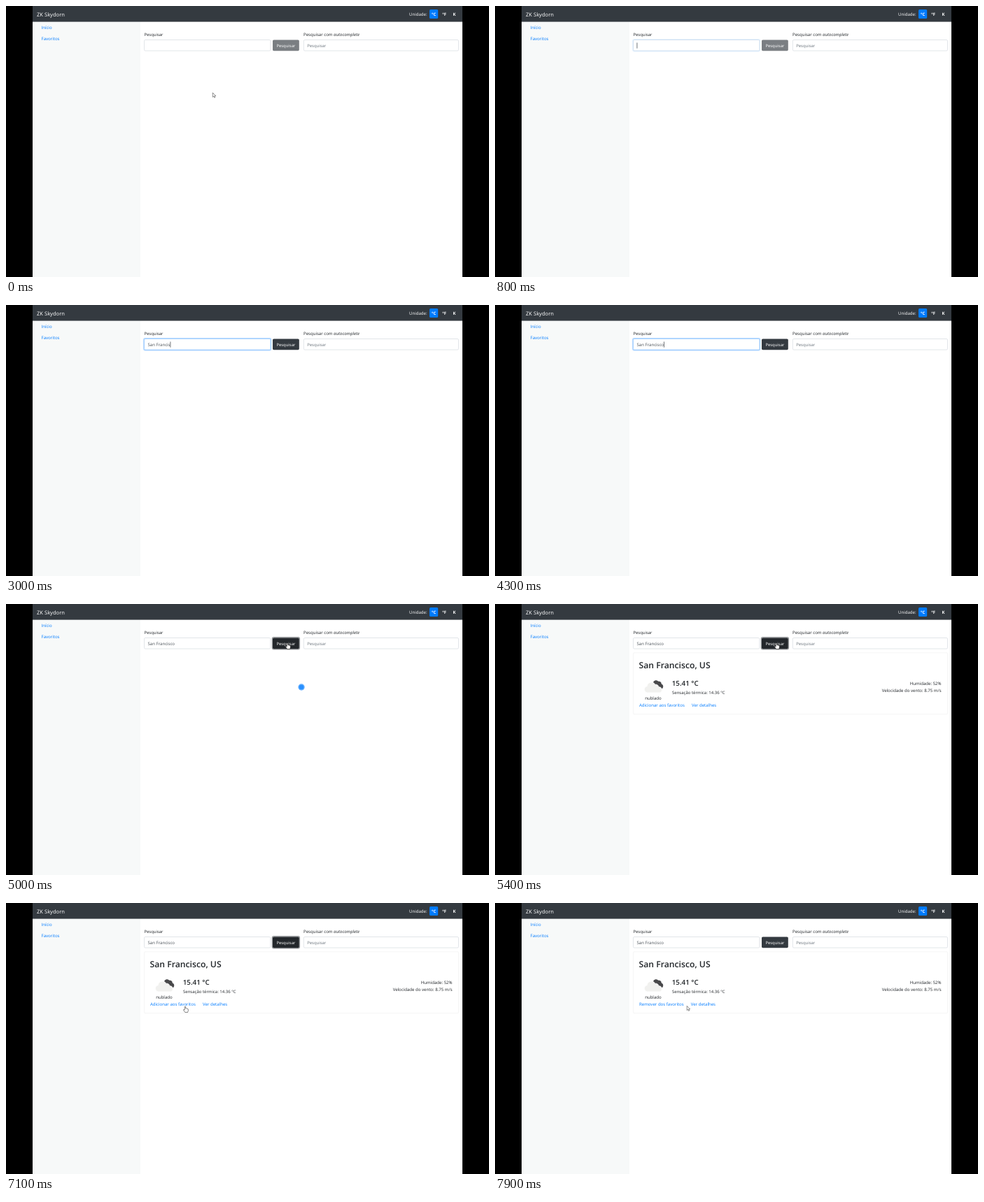
An HTML page for the animation above (8 s loop, 690x388 px).

```html
<!DOCTYPE html>
<html lang="pt">
<head>
<meta charset="utf-8">
<title>Clima</title>
<style>
html, body { margin: 0; width: 100%; height: 100%; overflow: hidden; background: #000; }
svg { display: block; width: 690px; height: 388px; }
text { font: 6.08px "Open Sans", "Noto Sans", sans-serif; fill: #212529; white-space: pre; text-rendering: geometricPrecision; }
.brand { font-size: 7.6px; fill: #fff; }
.unit { font-size: 6px; font-weight: 700; fill: #fff; text-anchor: middle; }
.label { font-size: 5.95px; }
.link { fill: #007bff; }
.hint { font-size: 5.95px; fill: #6c757d; }
.value { fill: #495057; }
.city { font-size: 12.2px; font-weight: 600; }
.temp { font-size: 9.75px; font-weight: 600; }
.end { text-anchor: end; }
.field { fill: #fff; stroke: #ced4da; stroke-width: .6; }
.ring { fill: none; stroke-width: 1.4; }
</style>
</head>
<body>
<svg viewBox="0 0 690 388">
  <rect width="690" height="388" fill="#000"/>
  <rect x="38" width="614" height="388" fill="#fff"/>
  <rect x="38" y="22" width="154" height="366" fill="#f7f9f9"/>
  <rect x="38" width="614" height="22.6" fill="#343a40"/>
  <text class="brand" x="44" y="14.7">ZK Skydorn</text>
  <text x="576" y="13.9" style="fill:#fff">Unidade:</text>
  <rect x="605" y="5" width="12.2" height="13" rx="1.6" fill="#007bff"/>
  <text class="unit" x="611.2" y="14">°C</text>
  <text class="unit" x="626.2" y="14">°F</text>
  <text class="unit" x="640.6" y="14">K</text>
  <text class="link" x="50.5" y="33">Início</text>
  <text class="link" x="50.5" y="49.3">Favoritos</text>

  <text class="label" x="197.4" y="42.9">Pesquisar</text>
  <rect id="inputRing" class="ring" x="196.8" y="47.8" width="181.8" height="17" rx="2" stroke="#007bff"/>
  <rect id="input" class="field" x="197.5" y="48.5" width="180.4" height="15.6" rx="1.6"/>
  <text id="query" class="value" x="202.5" y="59"></text>
  <rect id="caret" y="52.5" width=".7" height="8.2" fill="#343a40"/>
  <rect id="btnRing" class="ring" x="380.4" y="47.8" width="39" height="17" rx="2" stroke="#343a40"/>
  <g id="btn">
    <rect id="btnFill" x="381" y="48.4" width="37.8" height="15.8" rx="1.6"/>
    <text x="399.9" y="58.9" style="fill:#fff;text-anchor:middle;font-size:5.9px">Pesquisar</text>
  </g>
  <text x="425" y="42.9">Pesquisar com <tspan font-style="italic">autocomplete</tspan></text>
  <rect class="field" x="425.3" y="48.5" width="221.2" height="15.6" rx="1.6"/>
  <text class="hint" x="430.2" y="59">Pesquisar</text>

  <g id="spinner" fill="#007bff" fill-opacity=".6">
    <circle id="bounceA" cx="422" cy="119"/>
    <circle id="bounceB" cx="422" cy="119"/>
  </g>

  <g id="card">
    <rect x="197.4" y="69.8" width="449.2" height="88" rx="1.6" fill="#fff" stroke="#ececec" stroke-width=".6"/>
    <text class="city" x="205.6" y="92">San Francisco, US</text>
    <path d="M228 118a3.5 3.5 0 0 1 -2 -6a4.3 4.3 0 0 1 7.4 -1.2a4 4 0 0 1 4.4 3.6a4 4 0 0 1 -.8 7.6h-5z" fill="#48484a"/>
    <path d="M217.5 127a4.6 4.6 0 0 1 -.4 -9.1a6.2 6.2 0 0 1 11.6 -2.6a4.2 4.2 0 0 1 5.2 3.6a4.1 4.1 0 0 1 1.2 8.1z" fill="#f1f1ef" stroke="#fff" stroke-width=".8"/>
    <text x="214.2" y="137">nublado</text>
    <text class="temp" x="252.8" y="116.6">15.41 °C</text>
    <text x="253" y="129.4" style="font-size:6px">Sensação térmica: 14.36 °C</text>
    <text class="end" x="637.6" y="116">Humidade: 52%</text>
    <text class="end" x="637.6" y="125.8">Velocidade do vento: 8.75 m/s</text>
    <text id="favorite" class="link" x="206" y="147"></text>
    <text id="details" class="link" y="147">Ver detalhes</text>
  </g>

  <path id="arrow" d="M0 0V6.2L1.5 4.9L2.5 7.1L3.5 6.6L2.5 4.5H4.4Z" fill="#fff" stroke="#333" stroke-width=".55"/>
  <path id="hand" d="M-.8 .6Q0 -.5 .7 .6V3Q1.6 2.5 2 3.2Q2.9 2.8 3.2 3.6Q4.2 3.3 4.3 4.3V6.2L3.5 8.6H-.2L-2.4 5.4Q-2.6 4.3 -1.6 4.5L-.8 5.2Z" fill="#fff" stroke="#222" stroke-width=".55"/>
</svg>
<script>
const LOOP = 8000, STEP = 100;
const QUERY = 'San Francisco';
const KEYS = [1600, 1800, 1900, 2100, 2300, 2500, 2600, 2700, 2800, 2900, 3000, 3100, 3300];
const FOCUS = 800, CLICK = 4600, RESULT = 5200, FAVORITE = 7300;

// time, pointer shape, x, y
const POINTER = [
  [0, 'arrow', 295.3, 124.2], [100, 'arrow', 293, 119], [200, 'arrow', 286, 105],
  [300, 'arrow', 278, 87], [400, 'arrow', 270.5, 70], [500, ''],
  [4400, 'arrow', 380, 43], [4500, 'hand', 394, 51], [4600, 'hand', 402, 56],
  [6300, 'arrow', 389.6, 72.4], [6400, 'arrow', 368, 89], [6500, 'arrow', 345, 104],
  [6600, 'arrow', 305, 126], [6700, 'arrow', 272, 142], [6800, 'hand', 257.6, 148.6],
  [7000, 'hand', 256.6, 148.2], [7100, 'hand', 256, 148],
  [7800, 'hand', 264, 147.8], [7900, 'arrow', 274.2, 147.4]
];

const el = {};
document.querySelectorAll('[id]').forEach(n => el[n.id] = n);
const set = (node, attrs) => { for (const k in attrs) node.setAttribute(k, attrs[k]); };
const show = (node, on) => { node.style.display = on ? '' : 'none'; };
const write = (node, s) => { if (node.textContent !== s) node.textContent = s; };
const clamp = v => Math.max(0, Math.min(1, v));
const smooth = v => v * v * (3 - 2 * v);
const mix = (a, b, k) => 'rgb(' + a.map((v, i) => Math.round(v + (b[i] - v) * k)) + ')';

function drawSearch(t) {
  const typed = KEYS.filter(k => k <= t).length;
  write(el.query, QUERY.slice(0, typed));
  const focus = t < FOCUS ? 0 : t < CLICK ? clamp((t - FOCUS + 40) / 130) : clamp(1 - (t - CLICK + 40) / 130);
  el.input.style.stroke = mix([206, 212, 218], [128, 189, 255], focus);
  set(el.inputRing, { 'stroke-opacity': .3 * focus });
  const blinkOff = (t >= 1300 && t < 1600) || (t >= 3800 && t < 4300);
  show(el.caret, t >= FOCUS && t < CLICK && !blinkOff);
  set(el.caret, { x: 202.6 + (typed ? el.query.getComputedTextLength() : 0) });
}

function drawButton(t) {
  const hover = clamp((t - 4460) / 130) * clamp(1 - (t - FAVORITE + 40) / 130);
  const ring = t < CLICK ? 0 : clamp((t - CLICK + 40) / 130) * clamp(1 - (t - FAVORITE + 40) / 130);
  set(el.btn, { opacity: t < KEYS[0] ? .65 : 1 });
  set(el.btnFill, { fill: mix([52, 58, 64], [35, 39, 43], hover) });
  set(el.btnRing, { 'stroke-opacity': .5 * ring });
}

function drawResult(t) {
  show(el.spinner, t >= CLICK && t < RESULT);
  const grow = smooth(clamp((t - CLICK + 40) / 1000));
  set(el.bounceA, { r: 8 * grow });
  set(el.bounceB, { r: 8 * (1 - grow) });
  show(el.card, t >= RESULT);
  const saved = t >= FAVORITE;
  write(el.favorite, saved ? 'Remover dos favoritos' : 'Adicionar aos favoritos');
  set(el.details, { x: saved ? 279.8 : 281 });
}

function drawPointer(t) {
  const [, shape, x, y] = POINTER.filter(p => p[0] <= t).pop();
  for (const name of ['arrow', 'hand']) {
    show(el[name], shape === name);
    if (shape === name) set(el[name], { transform: `translate(${x} ${y})` });
  }
}

function render(now) {
  const t = Math.floor((now % LOOP) / STEP) * STEP;
  drawSearch(t);
  drawButton(t);
  drawResult(t);
  drawPointer(t);
}

let start;
function tick(now) {
  if (start === undefined) start = now;
  render(Math.max(0, now - start));
  requestAnimationFrame(tick);
}
render(0);
requestAnimationFrame(tick);
</script>
</body>
</html>
```
